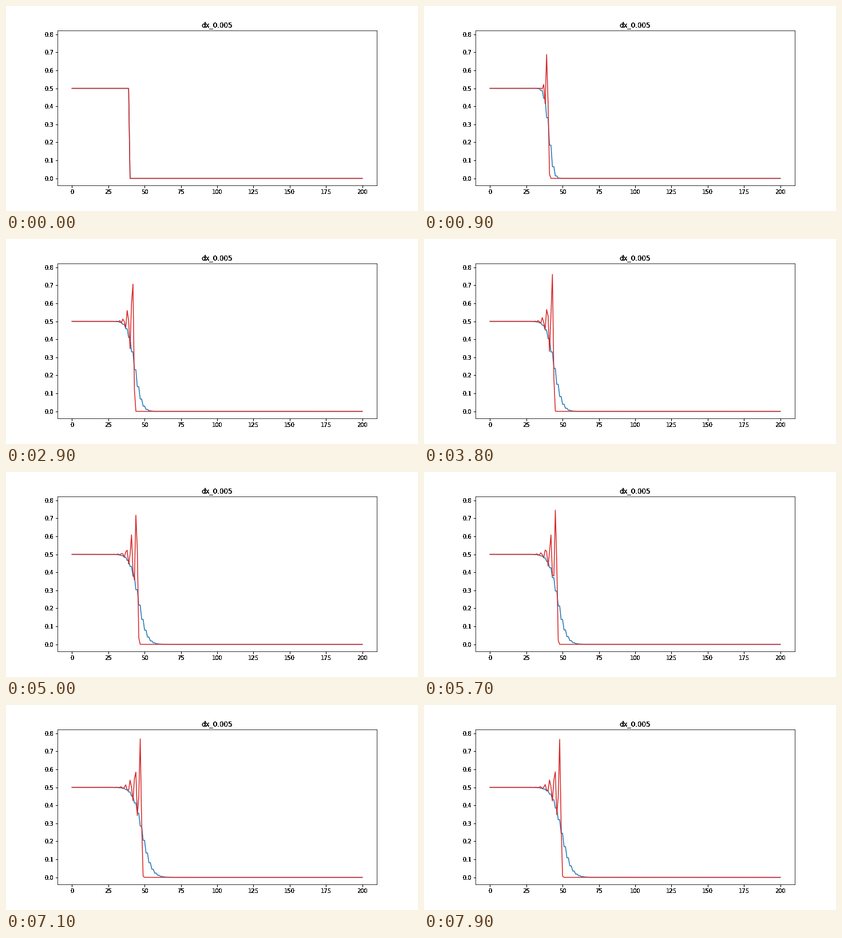
A matplotlib script that plays this animation: 720x360 px, repeating every 8 s.

```python
"""Inviscid Burgers shock: Lax-Friedrichs (blue) against Richtmyer (red)."""
import matplotlib.pyplot as plt
import numpy as np
from matplotlib.animation import FuncAnimation

DX = 0.005
DT = 0.0025
CELLS = 201
FRAMES = 80
R = DT / DX


def flux(u):
    return u**2 / 2


def lax_friedrichs(u):
    new = u.copy()
    f = flux(u)
    new[1:-1] = (u[2:] + u[:-2]) / 2 - R / 2 * (f[2:] - f[:-2])
    return new


def richtmyer(u):
    new = u.copy()
    half = (u[1:] + u[:-1]) / 2 - R / 2 * np.diff(flux(u))
    new[1:-1] -= R * np.diff(flux(half))
    return new


def solve(step):
    u = np.where(np.arange(CELLS) < 40, 0.5, 0.0)
    history = [u]
    for _ in range(FRAMES - 1):
        u = step(u)
        history.append(u)
    return np.array(history)


def harden(image, dpi):
    """Turn soft glyph edges into solid pixels."""
    image[..., 3] = image[..., 3] > 0.25
    return image, 0, 0


runs = [solve(lax_friedrichs), solve(richtmyer)]
peak = max(run.max() for run in runs)

plt.rcParams["font.family"] = "DejaVu Sans"
plt.rcParams["font.size"] = 10
fig, ax = plt.subplots(figsize=(10, 5), dpi=72, facecolor="white")
fig.subplots_adjust(left=0.125, right=0.9, bottom=0.125, top=0.88)
ax.set_title(f"dx_{DX}", fontsize=12)
ax.set_xlim(-10, 210)
ax.set_ylim(-0.05 * peak, 1.05 * peak)
ax.set_xticks(range(0, 201, 25))
ax.set_yticks(np.arange(9) / 10)
for part in (ax.title, ax.xaxis, ax.yaxis):
    part.set_agg_filter(harden)

lines = [
    ax.plot(run[0], color=color, lw=1.5)[0]
    for run, color in zip(runs, ("tab:blue", "tab:red"))
]


def draw(n):
    for line, run in zip(lines, runs):
        line.set_ydata(run[n])
    return lines


anim = FuncAnimation(fig, draw, frames=FRAMES, interval=100, repeat=True, repeat_delay=0)
plt.show()
```
